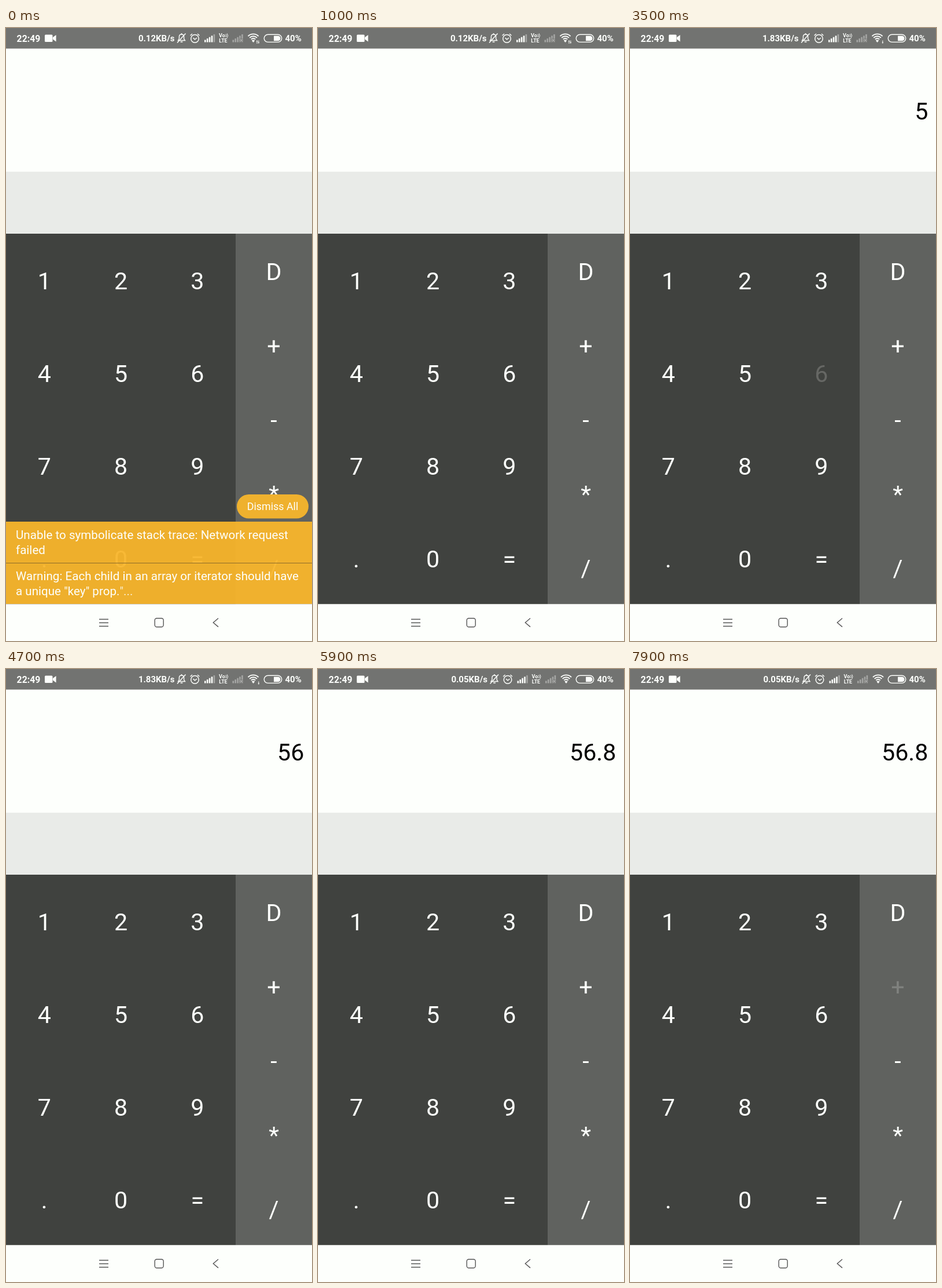
An HTML page with a canvas that plays this animation: 529x1058 px, repeating every 8000 ms.

```html
<!DOCTYPE html>
<html lang="en">
<head>
<meta charset="utf-8">
<title>Calculator</title>
<style>
  html, body { margin: 0; width: 100%; height: 100%; overflow: hidden; background: #fdfffc; }
  canvas { display: block; width: 529px; height: 1058px; }
</style>
</head>
<body>
<canvas id="stage" width="529" height="1058"></canvas>
<script>
const ctx = document.getElementById('stage').getContext('2d');
const LOOP = 8000, STEP = 100;
const FONT = 'Roboto, sans-serif';
const WHITE = '#fdfffc', KEY_SIZE = 41.2, KEY_TOP = 355, KEY_HEIGHT = 639.5;

// Presses dim a key at once; releases fade it back.
const presses = [
  { key: '5', down: 3100, up: 3150 },
  { key: '6', down: 3500, up: 3550 },
  { key: '.', down: 5100, up: 5250 },
  { key: '8', down: 5600, up: 5680 },
  { key: '+', down: 7900, up: 8100 }
];

// Traffic arrows beside the wifi icon: 2 both, 1 right only, 0 none.
const arrowChanges = [[0, 2], [2600, 1], [3700, 0], [4700, 1], [5700, 0], [6700, 2], [7700, 0]];
const speedChanges = [[0, '0.12'], [1200, '1.83'], [5100, '0.05']];

const valueAt = (changes, t) => changes.filter(([start]) => start <= t).pop()[1];

function rect(x, y, w, h, color) {
  ctx.fillStyle = color;
  ctx.fillRect(x, y, w, h);
}

function pill(x, y, w, h, r) {
  ctx.beginPath();
  ctx.roundRect(x, y, w, h, r);
}

function text(str, x, y, size, { color = WHITE, align = 'left', weight = 400 } = {}) {
  ctx.font = `${weight} ${size}px ${FONT}`;
  ctx.textAlign = align;
  ctx.fillStyle = color;
  ctx.fillText(str, x, y);
}

function stroke(d, width, color = WHITE) {
  ctx.strokeStyle = color;
  ctx.lineWidth = width;
  ctx.stroke(new Path2D(d));
}

function fill(d, color = WHITE) {
  ctx.fillStyle = color;
  ctx.fill(new Path2D(d));
}

function keyOpacity(key, t) {
  const press = presses.find(p => p.key === key);
  if (!press || t < press.down) return 1;
  if (t < press.up) return 0.2;
  const p = Math.min(1, (t - press.up) / 250);
  const eased = p < 0.5 ? 2 * p * p : 1 - 2 * (1 - p) * (1 - p);
  return 0.2 + 0.8 * eased;
}

function drawKey(key, x, centerY, t) {
  ctx.globalAlpha = keyOpacity(key, t);
  text(key, x, centerY + 16.3, KEY_SIZE, { align: 'center' });
  ctx.globalAlpha = 1;
}

function drawKeypad(t) {
  rect(0, KEY_TOP, 397, KEY_HEIGHT, '#40423f');
  rect(397, KEY_TOP, 132, KEY_HEIGHT, '#60625f');
  [...'123456789.0='].forEach((key, i) => {
    const row = Math.floor(i / 3);
    drawKey(key, 66.2 + 132.3 * (i % 3), KEY_TOP + KEY_HEIGHT * (row + 0.5) / 4, t);
  });
  [...'D+-*/'].forEach((key, i) => {
    drawKey(key, 463, KEY_TOP + KEY_HEIGHT * (i + 0.5) / 5, t);
  });
}

function drawDisplay(t) {
  rect(0, 248, 529, 107, '#e9ebe8');
  const typed = presses.filter(p => p.up <= t).map(p => p.key).join('');
  text(typed, 515.3, 158.3, KEY_SIZE, { color: '#000', align: 'right' });
}

function drawSignal(x, color, lit) {
  for (let i = 0; i < 5; i++) {
    const h = 4 + 2.4 * i;
    rect(x + i * 3.9, 24.5 - h, 2.6, h, i < lit ? color : '#a5a6a4');
  }
}

function drawBell() {
  stroke('M297.5 21.5H309.5L307.6 18.5V15C307.6 9.6 299.4 9.6 299.4 15V18.5Z', 1.4);
  stroke('M303.5 9V11M301.6 24H305.4M310.5 9.5L296 25.5', 1.5);
}

function drawAlarm() {
  ctx.beginPath();
  ctx.arc(326.5, 18.4, 6.8, 0, 2 * Math.PI);
  ctx.strokeStyle = WHITE;
  ctx.lineWidth = 1.5;
  ctx.stroke();
  stroke('M323.5 17L326.5 19.8L330 17M318.6 13L322 10M334.4 13L331 10', 1.5);
}

function drawVolte() {
  text('Vo', 368, 16.4, 9, { weight: 700 });
  stroke('M380 10.5Q381.8 13 380 16M382.2 9.5Q384.8 13 382.2 17', 1);
  text('LTE', 368.3, 24.8, 8.8, { weight: 700 });
}

function drawWifi(arrows) {
  ctx.strokeStyle = WHITE;
  ctx.lineWidth = 1.9;
  for (const r of [5.2, 9, 12.8]) {
    ctx.beginPath();
    ctx.arc(427.5, 23.2, r, -Math.PI * 0.75, -Math.PI * 0.25);
    ctx.stroke();
  }
  fill('M427.5 25L424.8 21.6Q427.5 19.6 430.2 21.6Z');
  if (arrows > 1) fill('M434 21L435.4 23.2H434.5V27H433.5V23.2H432.6Z');
  if (arrows > 0) fill('M436.8 27L438.2 24.8H437.3V21.4H436.3V24.8H435.4Z');
}

function drawStatusBar(t) {
  const arrows = valueAt(arrowChanges, t);
  rect(0, 0, 529, 35.5, '#727371');
  text('22:49', 18.6, 23.5, 15.8, { weight: 600 });
  pill(67, 11.5, 13.5, 12.5, 1.5);
  ctx.fillStyle = WHITE;
  ctx.fill();
  fill('M81 16L86.6 12V23.6L81 19.6Z');

  ctx.save();
  if (!arrows) ctx.translate(1.5, 0);
  text(valueAt(speedChanges, t) + 'KB/s', 291.5, 23.3, 15, { weight: 600, align: 'right' });
  drawBell();
  drawAlarm();
  drawSignal(343, WHITE, 4);
  drawVolte();
  drawSignal(391.5, '#a5a6a4', 5);
  stroke('M404.5 18.5L409.5 24M409.5 18.5L404.5 24', 2.6, '#727371');
  stroke('M404.8 18.8L409.2 23.7M409.2 18.8L404.8 23.7', 1.1, '#b4b5b3');
  drawWifi(arrows);
  ctx.restore();

  pill(446.2, 11.2, 30.5, 13.2, 6.6);
  ctx.strokeStyle = WHITE;
  ctx.lineWidth = 1.4;
  ctx.stroke();
  pill(463, 13.5, 11.5, 8.7, [0.5, 4.3, 4.3, 0.5]);
  ctx.fillStyle = WHITE;
  ctx.fill();
  text('40%', 482.5, 23.3, 15, { weight: 600 });
}

function drawWarnings(t) {
  const size = 20.6, amber = 'rgba(248,182,44,0.95)';
  rect(0, 852, 529, 71, amber);
  rect(0, 923, 529, 1, '#8d6c29');
  rect(0, 924, 529, 70, amber);
  text('Unable to symbolicate stack trace: Network request', 17, 882, size);
  text('failed', 17, 907.5, size);
  text('Warning: Each child in an array or iterator should have', 17, 953, size);
  const line = 'a unique "key" prop.';
  text(line, 17, 978.5, size);
  text('"...', 17 + ctx.measureText(line).width, 978.5, size, { color: 'rgba(253,255,252,0.8)' });

  // The button warms up slowly until it is released.
  const heat = Math.min(1, t / 900);
  pill(399, 805, 124, 41.5, 20.7);
  ctx.fillStyle = `rgb(${239 + 10 * heat},${177 - 2 * heat},${46 - 20 * heat})`;
  ctx.fill();
  text('Dismiss All', 461, 832, 17.9, { align: 'center' });
}

function drawNavBar() {
  rect(0, 994.5, 529, 63.5, WHITE);
  stroke('M161 1020.5H177M161 1026.5H177M161 1032.5H177', 1.3, '#555');
  pill(257.2, 1018.8, 15, 15, 3.5);
  ctx.lineWidth = 1.4;
  ctx.stroke();
  stroke('M367 1018.8L358.3 1026.2L367 1033.6', 1.4, '#555');
}

function draw(now) {
  const t = Math.floor((now % LOOP) / STEP) * STEP;
  rect(0, 0, 529, 1058, WHITE);
  drawStatusBar(t);
  drawDisplay(t);
  drawKeypad(t);
  if (t < 1000) drawWarnings(t);
  drawNavBar();
}

const start = performance.now();
function tick() {
  draw(performance.now() - start);
  requestAnimationFrame(tick);
}
tick();
</script>
</body>
</html>
```
